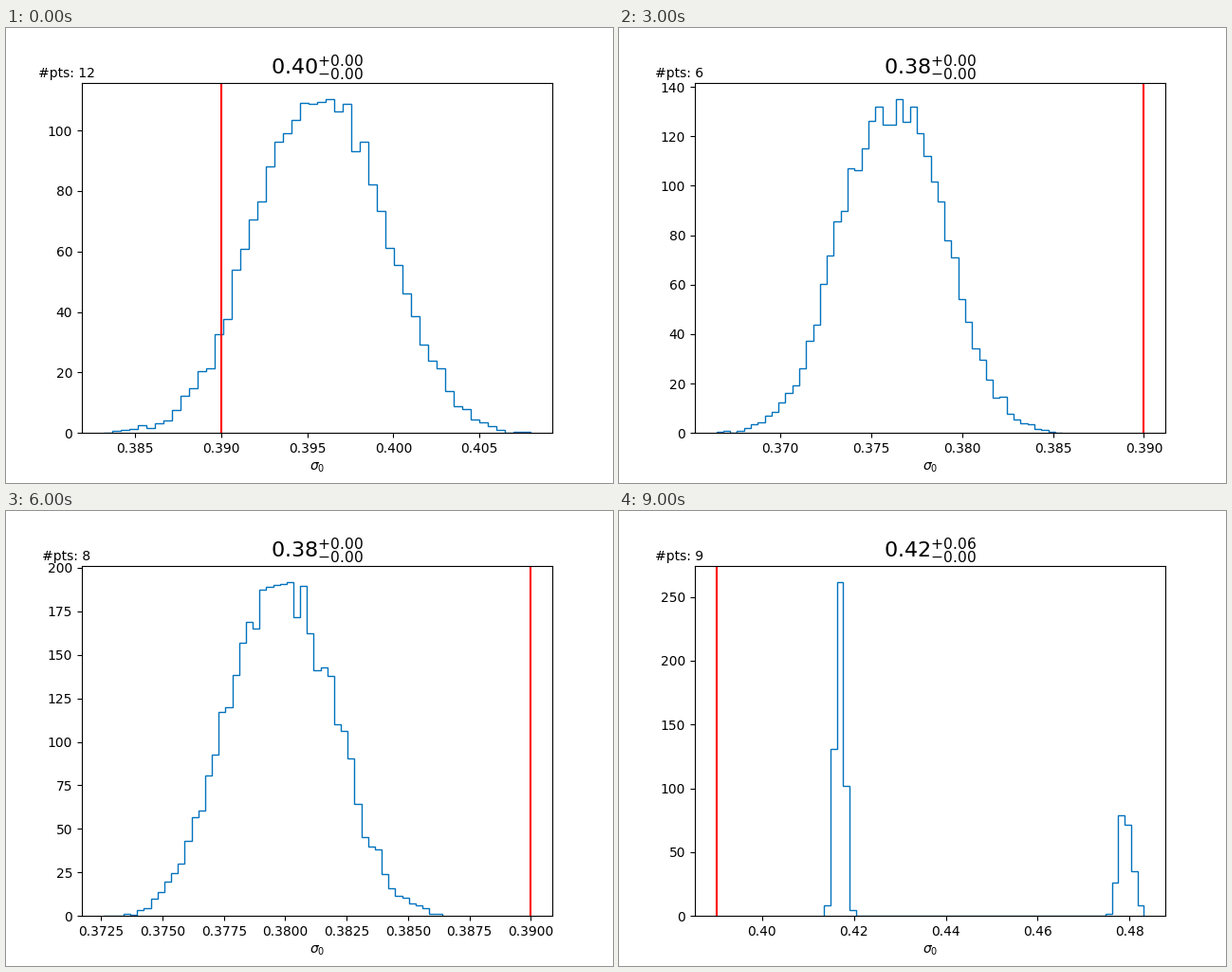
Animation, 640 px wide and 480 px high, one loop 10 s. Source, as a matplotlib script:

```python
import numpy as np
import matplotlib.pyplot as plt
from matplotlib.animation import FuncAnimation

BINS = 50
TRUTH = 0.39
BLUE = "#0072bd"
GRAIN = 0.04


def bell(height, centre, left, right):
    """Slightly flat-topped bump; left and right are its half-height widths."""
    d = np.arange(BINS) - centre
    reach = np.abs(d) / np.where(d < 0, left, right)
    return height * 0.5 ** (reach ** 2.2)


def sampled(peak, centre, left, right, seed):
    """A bump with counting noise, scaled so its tallest bin equals peak."""
    h = bell(1, centre, left, right)
    noise = np.random.default_rng(seed).normal(0, GRAIN, BINS)
    h = np.clip(h + noise * np.sqrt(h), 0, None)
    return h * peak / h.max()


def two_modes(low, high):
    h = bell(*low) + bell(*high)
    return np.where(h < 1, 0, h)


# points, median, upper error, first edge, last edge, densities
STEPS = [
    (12, "0.40", "0.00", 0.38314, 0.40799, sampled(110.3, 25, 9.2, 9, 12)),
    (4, "0.38", "0.00", 0.3745, 0.4948,
     two_modes((205, 1.1, 0.8, 0.8), (30, 48, 1, 0.8))),
    (5, "0.37", "0.00", 0.36974, 0.37884, sampled(324, 25, 8.4, 8.9, 5)),
    (6, "0.38", "0.00", 0.3665, 0.3855, sampled(135, 25, 9, 9, 6)),
    (3, "0.37", "0.00", 0.36322, 0.48937,
     two_modes((284.6, 0.42, 0.6, 0.6), (32, 48.56, 0.6, 0.6))),
    (10, "0.40", "0.00", 0.38882, 0.40817, sampled(162.5, 31.5, 9, 7.4, 10)),
    (8, "0.38", "0.00", 0.37259, 0.38641, sampled(191.7, 25.5, 9.3, 9.6, 8)),
    (11, "0.40", "0.00", 0.38281, 0.40844, sampled(116.6, 28.5, 8.7, 7.3, 11)),
    (7, "0.42", "0.05", 0.415, 0.47655,
     two_modes((270, 1.8, 0.9, 1), (85, 47.2, 0.9, 1))),
    (9, "0.42", "0.06", 0.41345, 0.48318,
     two_modes((262, 1.93, 0.93, 0.93), (81.5, 46.25, 1, 1.6))),
]

fig, ax = plt.subplots(figsize=(6.4, 4.8), dpi=100)
count = fig.text(0.1, 0.9, "", ha="center", va="center")


def draw(k):
    pts, median, upper, lo, hi, density = STEPS[k]
    ax.clear()
    ax.stairs(density, np.linspace(lo, hi, BINS + 1), color=BLUE, lw=1)
    ax.axvline(TRUTH, color="red", lw=1.5)
    lo, hi = min(lo, TRUTH), max(hi, TRUTH)
    pad = 0.05 * (hi - lo)
    ax.set_xlim(lo - pad, hi + pad)
    ax.set_ylim(0, 1.05 * density.max())
    ax.set_xlabel(r"$\sigma_0$")
    ax.set_title(rf"${{{median}}}_{{-0.00}}^{{+{upper}}}$", fontsize=16)
    count.set_text(f"#pts: {pts}")
    return []


anim = FuncAnimation(fig, draw, frames=len(STEPS), interval=1000,
                     init_func=lambda: draw(0), repeat=True)
plt.show()
```
